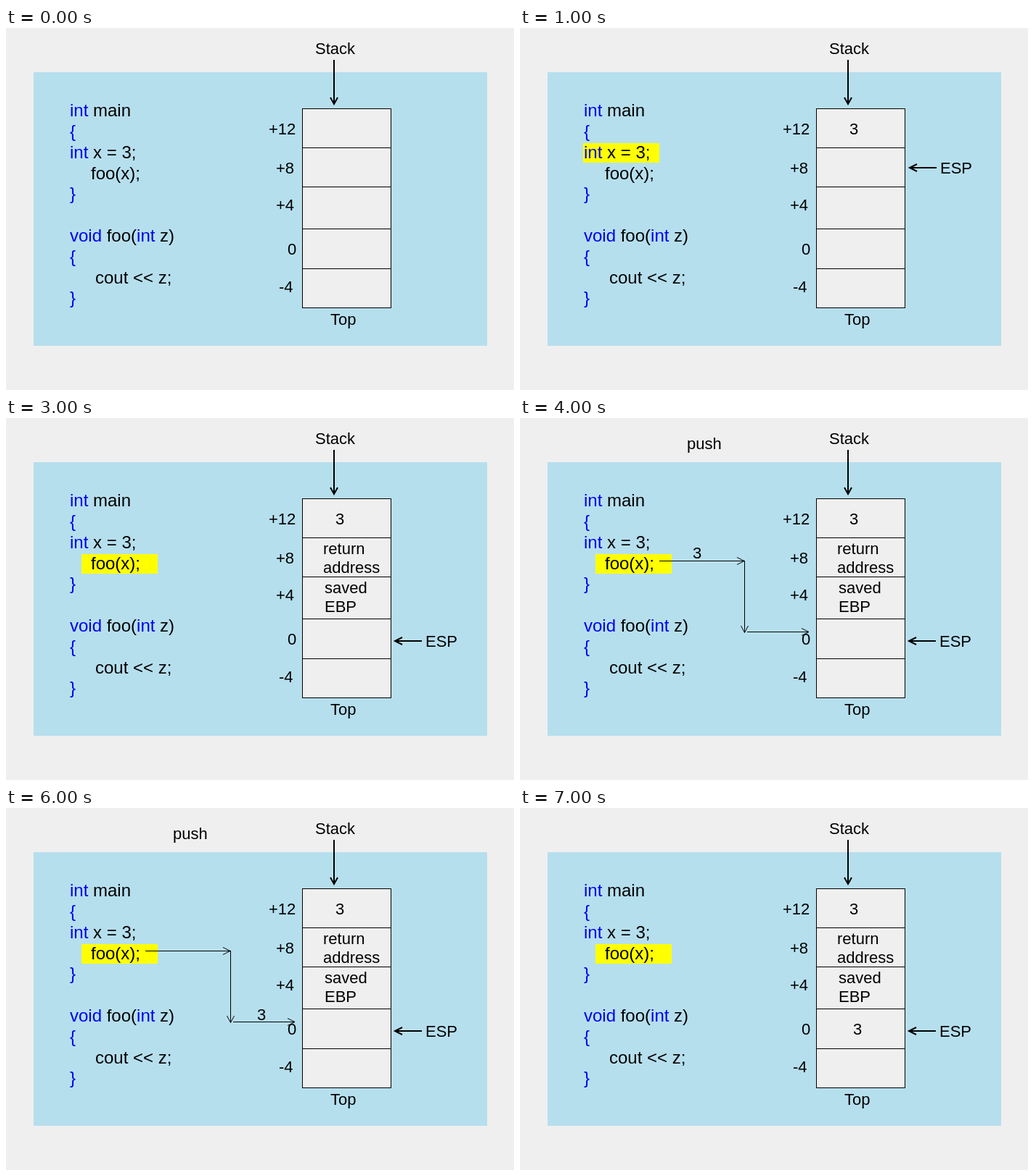
Recreate the animation shown at these times as an HTML page. Size 700 by 500 pixels, loop 8000 ms.

```html
<!DOCTYPE html>
<html lang="en">
<head>
<meta charset="utf-8">
<title>Call stack</title>
<style>
html, body { margin: 0; width: 100%; height: 100%; overflow: hidden; background: #efefef; }
svg { display: block; }
text { font: 22px Arial, "Liberation Sans", sans-serif; white-space: pre; }
.code text { font-size: 24px; }
.code tspan { fill: #0000f0; }
.line { fill: none; stroke: #000; }
.bold { stroke-width: 2; }
</style>
</head>
<body>
<svg width="700" height="500" viewBox="0 0 700 500">
  <rect x="38" y="61" width="625" height="378" fill="#b6dfee"/>
  <rect id="mark" width="105" height="27" fill="#ff0"/>

  <g class="code">
    <text x="88" y="122"><tspan>int</tspan> main</text>
    <text x="88" y="151"><tspan>{</tspan></text>
    <text x="88" y="180"><tspan>int</tspan> x = 3;</text>
    <text x="117" y="209">foo(x);</text>
    <text x="88" y="237"><tspan>}</tspan></text>
    <text x="88" y="295"><tspan>void</tspan> foo(<tspan>int</tspan> z)</text>
    <text x="88" y="324"><tspan>{</tspan></text>
    <text x="123" y="353">cout &lt;&lt; z;</text>
    <text x="88" y="381"><tspan>}</tspan></text>
  </g>

  <rect x="408.5" y="111.5" width="122" height="275" fill="#efefef" stroke="#000"/>
  <path class="line" d="M408 165.5h122M408 219.5h122M408 277.5h122M408 332.5h122"/>
  <text x="426" y="36">Stack</text>
  <path class="line bold" d="M452 44V105M447 96L452 105L457 96"/>
  <text x="447" y="410">Top</text>
  <text x="362" y="147">+12</text>
  <text x="372" y="201">+8</text>
  <text x="372" y="252">+4</text>
  <text x="388" y="313">0</text>
  <text x="376" y="365">-4</text>

  <g data-from="1"><text x="454" y="147">3</text></g>
  <g data-from="2">
    <text x="437" y="188">return</text>
    <text x="437" y="214">address</text>
  </g>
  <g data-from="3">
    <text x="439" y="242">saved</text>
    <text x="439" y="268">EBP</text>
  </g>
  <g data-from="7"><text x="459" y="313">3</text></g>

  <g id="pointer">
    <path class="line bold" d="M574 0H537M547 -5L537 0L547 5"/>
    <text x="579" y="8">ESP</text>
  </g>

  <g data-from="4" data-to="7">
    <text x="230" y="43">push</text>
    <path class="line" d="M192 197.5H309M299 192.5L309 197.5L299 202.5
      M309.5 197V296M304.5 287L309.5 296.5L314.5 287
      M313 295.5H398M388 290.5L398 295.5L388 300.5"/>
    <text id="value">3</text>
  </g>
</svg>
<script>
const STEP = 1000, STEPS = 8;
const byId = id => document.getElementById(id);
const timed = document.querySelectorAll('[data-from]');
const pointerSpots = [[0, 193], [-1, 250], [-1, 308]];
const valueSpots = [[238, 194], [314, 252], [346, 293]];

const show = (el, on) => el.setAttribute('visibility', on ? 'visible' : 'hidden');
const place = (el, [x, y]) => el.setAttribute('transform', `translate(${x} ${y})`);
const pick = (list, i) => list[Math.max(0, Math.min(i, list.length - 1))];

function draw(now) {
  const step = Math.floor(now / STEP) % STEPS;
  for (const el of timed) {
    show(el, step >= el.dataset.from && step < (el.dataset.to || STEPS));
  }
  show(byId('mark'), step > 0);
  place(byId('mark'), step < 2 ? [87, 159] : [104, 188]);
  show(byId('pointer'), step > 0);
  place(byId('pointer'), pick(pointerSpots, step - 1));
  // The group's own visibility governs the moving value.
  place(byId('value'), pick(valueSpots, step - 4));
}

const start = performance.now();
function tick() {
  draw(performance.now() - start);
  requestAnimationFrame(tick);
}
tick();
</script>
</body>
</html>
```
